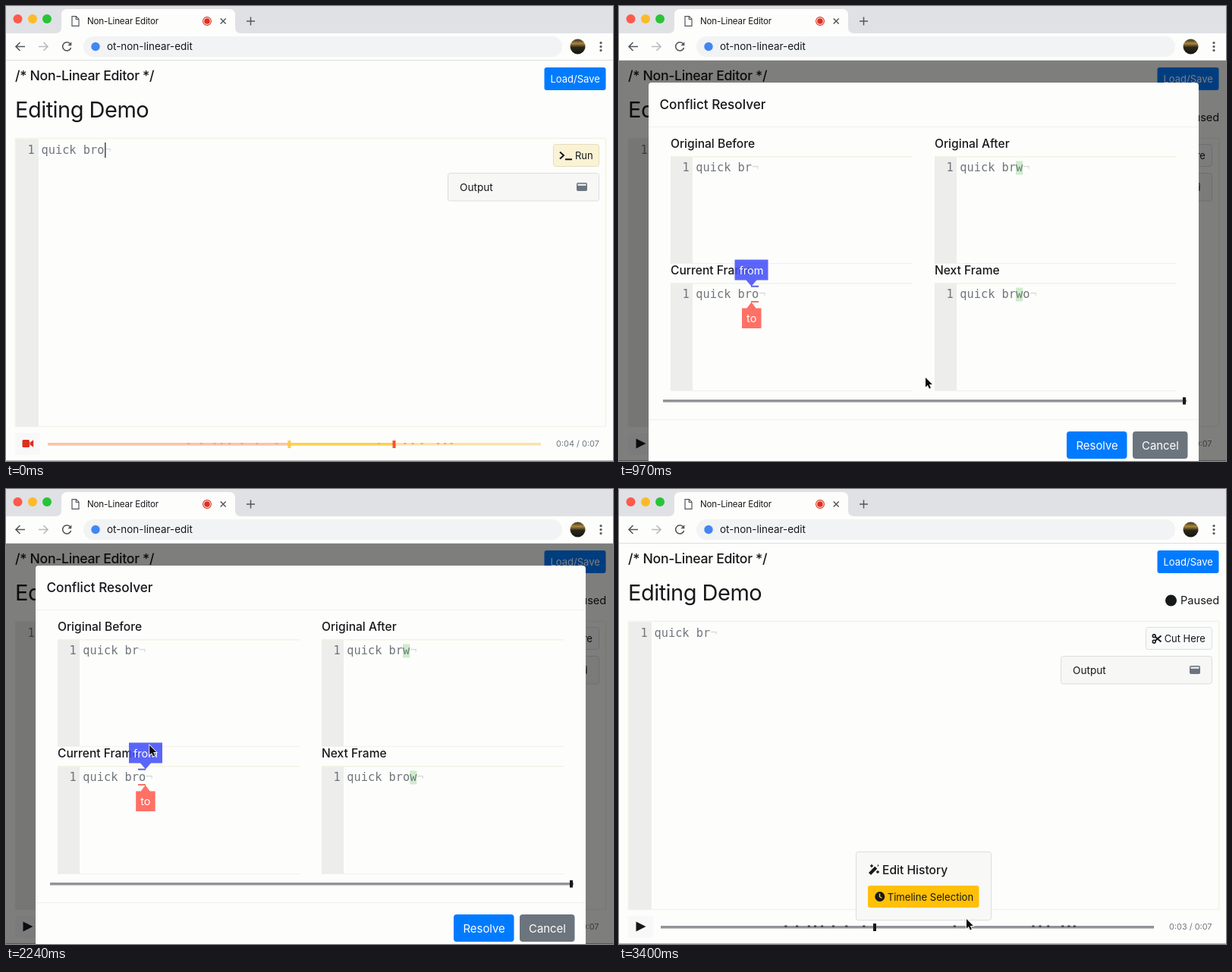
Write an HTML page that moves like this. It is 800 px wide and 600 px high and loops after 3430 ms.

```html
<!DOCTYPE html>
<html lang="en">
<head>
<meta charset="utf-8">
<title>Non-Linear Editor</title>
<style>
  html, body { margin: 0; width: 100%; height: 100%; overflow: hidden; background: #fdfdfc; }
  svg { display: block; width: 800px; height: 600px; }
  text { font-family: Inter, "Open Sans", sans-serif; fill: #16181a; }
  .tight { letter-spacing: -.018em; }
  .mid { font-weight: 500; }
  .light { fill: #fff; }
  .muted { fill: #6c757d; }
  .code { font: 15.3px "DejaVu Sans Mono", monospace; fill: #70767c; white-space: pre; }
  .eol { fill: #d8d9d9; }
  .line { fill: none; stroke: #16181a; stroke-width: 1.6; }
  .icon { stroke: #54585c; }
</style>
</head>
<body>
<svg id="stage" viewBox="0 0 800 600" xmlns="http://www.w3.org/2000/svg"></svg>
<script>
const LOOP = 3430, OPEN = 515, CLOSE = 3150;
const INK = '#16181a', PAPER = '#fdfdfc', GUTTER = '#ededec', EDGE = '#f3f3e2', RULE = '#f1f1e8';
const BORDER = '#dcdddd', BLUE = '#007bff', GRAY = '#6c757d', TRACK = '#929298', RED = '#dc3020';

const rect = (x, y, w, h, fill, extra = '') =>
  `<rect x="${x}" y="${y}" width="${w}" height="${h}" fill="${fill}" ${extra}/>`;
const box = (x, y, w, h, fill, stroke, extra = '') =>
  rect(x + .5, y + .5, w - 1, h - 1, fill, `rx="3" stroke="${stroke}" ${extra}`);
const circle = (x, y, r, fill, extra = '') =>
  `<circle cx="${x}" cy="${y}" r="${r}" fill="${fill}" ${extra}/>`;
const path = (d, extra = '') => `<path d="${d}" ${extra}/>`;
const text = (x, y, s, size, extra = '') =>
  `<text x="${x}" y="${y}" font-size="${size}" ${extra}>${s}</text>`;
const code = (x, y, s, id = '') =>
  `<text class="code" x="${x}" y="${y}" ${id && `id="${id}"`}>${s}<tspan class="eol">¬</tspan></text>`;

function chrome() {
  return rect(0, 0, 800, 36, '#dfe1e5') + rect(0, 36, 800, 35, PAPER) + rect(0, 71, 800, 1, '#dcdddd') +
    path('M65 36q8 0 8-8V12q0-8 8-8h213q8 0 8 8v16q0 8 8 8z', `fill="${PAPER}"`) +
    circle(15.5, 17, 6, '#fc5a4c') + circle(35, 17, 6, '#fdba28') + circle(54, 17, 6, '#28c438') +
    path('M87 13.7h5.5l3.5 3.5v9.1h-9zM92.3 14v3.5h3.5', 'class="line icon" style="stroke-width:1.2"') +
    text(107, 24, 'Non-Linear Editor', 11.6, 'style="letter-spacing:-.015em"') +
    circle(265, 20, 5.4, 'none', `stroke="${RED}" stroke-width="1.1"`) + circle(265, 20, 3.8, RED) +
    path('M282.7 16.5l7 7m0-7l-7 7M317 20h11m-5.5-5.5v11', 'class="line icon" style="stroke-width:1.5"') +
    path('M25 53.5H13m5.5-5.5L13 53.5l5.5 5.5', 'class="line icon"') +
    path('M43 53.5h12m-5.5-5.5l5.5 5.5l-5.5 5.5', 'class="line" style="stroke:#b8babd"') +
    path('M84.7 50a5.6 5.6 0 1 0 .9 5', 'class="line icon"') + path('M86.3 47.3v5h-5z', 'fill="#54585c"') +
    rect(102, 40, 631, 27, '#f1f3f4', 'rx="13.5"') + circle(118, 53.5, 5.7, '#4285f4') +
    text(133, 58, 'ot-non-linear-edit', 13.45) +
    circle(753.5, 53.5, 10, 'url(#photo)') +
    [48.5, 53.5, 58.5].map(y => circle(784, y, 1.6, '#54585c')).join('');
}

function commonPage() {
  return rect(0, 72, 800, 528, PAPER) +
    text(12, 98, '/* Non-Linear Editor */', 17.7, 'class="mid tight"') +
    text(12, 147, 'Editing Demo', 29, 'class="tight"') +
    rect(709.5, 81, 81, 30, BLUE, 'rx="3"') + text(717.5, 101, 'Load/Save', 13, 'class="light"') +
    rect(12.5, 174.5, 778, 380, PAPER, `stroke="${EDGE}" stroke-width="1.5"`) +
    rect(13, 175.5, 30, 379, GUTTER) +
    '<text class="code" x="28.5" y="195">1</text>' +
    box(582, 220, 200, 37.5, '#f7f7f6', BORDER) + text(598, 243.5, 'Output', 13.6) +
    rect(752.5, 233.5, 13, 10, GRAY, `rx="1" stroke="${GRAY}"`) +
    rect(753.5, 234.5, 11, 2.5, '#e4e6e7') +
    rect(0, 599, 800, 1, '#b0b0b0');
}

function recordPage() {
  return code(46.5, 195, 'quick bro') + rect(130, 180, 1.6, 20, '#4c5458', 'id="caret"') +
    box(721, 182, 61, 30, '#fbf2d4', '#e4dcbc') +
    path('M730 192.5l5 4.5l-5 4.5M737 202.2h9', 'class="line" style="stroke-width:2"') +
    text(750, 202, 'Run', 13) +
    rect(12, 563, 33, 29, '#f8f8f8', 'id="recBtn" rx="3"') +
    rect(21.5, 572, 9.5, 10, RED, 'rx="1.5"') + path('M31.5 575.5l4.7-3.2v9.4l-4.7-3.2z', `fill="${RED}"`) +
    rect(55, 576, 650, 3.5, '#fbe3a6') + rect(55, 576, 0, 3.5, '#fac4a8', 'id="before"') +
    rect(0, 576, 0, 3.5, '#ffd04c', 'id="span"') + '<g id="recTicks"></g>' +
    rect(0, 573, 4, 10, '#ffcb48', 'id="startPin"') + rect(0, 573, 4, 10, '#ff5030', 'id="endPin"') +
    text(725, 581, '', 10.9, 'id="clock" class="muted"');
}

function pausedPage() {
  return code(46.5, 195, 'quick br') +
    circle(727.5, 147, 7.5, INK) + text(740, 152, 'Paused', 14.6) +
    box(694, 182, 88, 30, '#f9fafa', BORDER) +
    path('M706.5 194.8l8 6.7M706.5 200.2l8-6.7', 'class="line" style="stroke-width:2"') +
    circle(705.2, 193.8, 1.9, 'none', 'class="line"') + circle(705.2, 201.2, 1.9, 'none', 'class="line"') +
    text(718.7, 202, 'Cut Here', 12.9) +
    rect(12, 563, 33, 29, '#f8f8f8', 'rx="3"') + path('M22.5 570.5l13 6.5l-13 6.5z', `fill="${INK}"`) +
    rect(55, 576, 650, 3.5, TRACK) + '<g id="pauseTicks"></g>' + rect(335, 573, 4, 10, INK) +
    text(725, 581, '0:03 / 0:07', 10.9, 'class="muted"') +
    box(312, 478, 179, 91, '#f8f8f7', BORDER) +
    path('M330.5 507.5l8.5-8.5', 'class="line" style="stroke-width:4.2"') +
    path('M337.5 497.5l3.5 3.5', 'stroke="#f8f8f7" stroke-width="1"') +
    path('M333 495v4m-2-2h4M341 503v4m-2-2h4M341.5 495.5v2', 'class="line" style="stroke-width:1.4"') +
    text(347, 508, 'Edit History', 15.6, 'class="mid"') +
    rect(328, 523, 146.5, 29, '#ffc007', 'rx="3"') + circle(343.8, 537.5, 6.5, INK) +
    path('M343.5 533.5v4l3 2', 'fill="none" stroke="#ffc007" stroke-width="1.5"') +
    text(353.7, 542.5, 'Timeline Selection', 13.1);
}

function pane(x, y, h, title, body, id = '') {
  const marked = body.indexOf('w') > 0;
  return text(x, y - 12, title, 15.6, 'class="mid"') + rect(x, y, 29, h, GUTTER) +
    rect(x, y - 1, 319, 1.5, EDGE) + rect(x, y + h, 319, 1, RULE) +
    (marked ? rect(x + 107, y + 5.5, 9.2, 18, '#cdeccb', id && `id="${id}Mark"`) : '') +
    `<text class="code" x="${x + 15.5}" y="${y + 19}">1</text>` + code(x + 33.3, y + 19, body, id);
}

function dialog() {
  return rect(39, 101, 725, 520, PAPER, 'rx="4"') +
    text(53.5, 136, 'Conflict Resolver', 17.15, 'class="mid"') +
    rect(39, 159, 725, 1, RULE) + rect(39, 545, 725, 1, RULE) +
    pane(68, 199, 140, 'Original Before', 'quick br') +
    pane(416, 199, 140, 'Original After', 'quick brw') +
    rect(174, 371, 10, 18, '#ffd4bc', 'id="range"') +
    pane(68, 366, 141, 'Current Frame', 'quick bro') +
    pane(416, 366, 141, 'Next Frame', 'quick brwo', 'next') +
    rect(174, 368.7, 10, 2, '#5862d0') + rect(174, 389, 10, 2, '#f07868') +
    '<g id="from">' + path('M152.5 334.5h44v27h-15l-7 8l-7-8h-15z', 'fill="#434ffa" fill-opacity=".87"') +
    text(174.5, 353.5, 'from', 14.5, 'text-anchor="middle" class="light"') + '</g>' +
    '<g id="to">' + path('M162 398.5h6.5l6-8l6 8h7v26.5h-25.5z', 'fill="#ff7066"') +
    text(174.7, 417, 'to', 14.5, 'text-anchor="middle" class="light"') + '</g>' +
    rect(58, 519, 690, 3.5, TRACK) + rect(743, 516, 4, 9.5, INK) +
    rect(588.5, 559.5, 82, 39, '#8fbdf4', 'id="ring" rx="5"') +
    rect(590, 561, 79.5, 36, BLUE, 'id="resolve" rx="4"') +
    text(602.5, 584.5, 'Resolve', 14.9, 'class="light"') +
    rect(677, 561, 72.5, 36, GRAY, 'rx="4"') + text(689, 584.5, 'Cancel', 14.9, 'class="light"');
}

const stage = document.getElementById('stage');
stage.innerHTML =
  `<defs><linearGradient id="photo" x1="0" y1="0" x2="0" y2="1">
    <stop offset="0" stop-color="#3a3220"/><stop offset=".3" stop-color="#a8863c"/>
    <stop offset=".55" stop-color="#2c2618"/><stop offset="1" stop-color="#141410"/>
  </linearGradient></defs>` +
  commonPage() + `<g id="recording">${recordPage()}</g><g id="paused">${pausedPage()}</g>` +
  `<g id="modal">${rect(0, 71, 800, 529, '#000', 'opacity=".5"')}${dialog()}</g>` + chrome() +
  path('M0 0v12.6l2.9-2.7l2 4.5l2-.9l-2-4.4h4z',
    'id="mouse" fill="#0a0a0a" stroke="#fff" stroke-width="1.6" paint-order="stroke"');

const el = {};
stage.querySelectorAll('[id]').forEach(n => el[n.id] = n);
const set = (id, attrs) => { for (const k in attrs) el[id].setAttribute(k, attrs[k]); };
const show = (id, on) => set(id, { visibility: on ? 'inherit' : 'hidden' });
const ramp = (t, a, b) => Math.max(0, Math.min(1, (t - a) / (b - a)));

const CUT = 3.43, LEN = 7, HEAD = 4.916, RATE = .81 / 470;
const early = [2, 2.18, 2.37, 2.47, 2.58, 2.76, 2.97, 3.25];
const typed = [4.7, 4.905];
const late = [1.93, 1.82, 1.69, 1.46, 1.36, 1.27];   // seconds before the end

function timeline(t) {
  const grown = RATE * Math.min(t, OPEN), len = LEN + grown;
  const at = s => 55 + 650 * s / len;
  return { at, marks: [...early, ...typed, ...late.map(s => len - s)], head: HEAD + grown };
}
const ticks = (tl, y, fill) => tl.marks.map(s => rect((tl.at(s) - 1.5).toFixed(2), y, 3, 2, fill)).join('');
el.pauseTicks.innerHTML = ticks(timeline(OPEN), 575.5, '#303234');

const route = [
  [170, 240, 440], [430, 31, 579], [540, 31, 579], [930, 404, 490], [1060, 404, 490],
  [1380, 176, 404], [1480, 176, 404], [1680, 187, 404], [1800, 187, 404], [2080, 183, 338],
  [2140, 183, 338], [2300, 192, 338], [2350, 192, 338], [2630, 532, 477],
  [2690, 532, 477], [2990, 619, 570], [3160, 619, 570], [3390, 458, 567], [LOOP, 458, 567]
];
function pointer(t) {
  let i = 1;
  while (i < route.length - 1 && route[i][0] < t) i++;
  const [t0, x0, y0] = route[i - 1], [t1, x1, y1] = route[i];
  const p = ramp(t, t0, t1), e = p * p * (3 - 2 * p);
  return [x0 + (x1 - x0) * e, y0 + (y1 - y0) * e];
}

function drawRecording(t) {
  const tl = timeline(t), a = tl.at(CUT), b = tl.at(tl.head);
  set('before', { width: a - 55 });
  set('span', { x: a, width: b - a });
  set('startPin', { x: a - 2 });
  set('endPin', { x: b - 2 });
  el.recTicks.innerHTML = ticks(tl, 576, '#f2a490');
  el.clock.textContent = `0:0${Math.floor(tl.head)} / 0:07`;
  set('recBtn', { fill: t > 390 ? '#e4e6e8' : '#f8f8f8' });
}

function drawModal(t) {
  const toMoved = t >= 1580, fromMoved = t >= 2220;
  const merged = fromMoved ? 'brow' : toMoved ? 'brw' : 'brwo';
  set('to', { transform: `translate(${toMoved ? 9.2 : 0} 0)` });
  set('from', { transform: `translate(${fromMoved ? 9.5 : 0} 0)` });
  show('range', toMoved && !fromMoved);
  el.next.firstChild.data = 'quick ' + merged;
  set('nextMark', { x: 449.3 + 9.21 * (6 + merged.indexOf('w')) });
  show('ring', t > 3030);
  set('resolve', { fill: t > 2920 ? '#0062cc' : BLUE });
}

function draw(t) {
  const live = t < OPEN;
  show('recording', live);
  show('paused', !live);
  show('caret', live && t < 295);
  show('modal', !live && t < CLOSE);
  if (live) drawRecording(t);
  drawModal(t);
  if (live || t >= CLOSE) show('range', false), show('ring', false);

  const [x, y] = pointer(t);
  show('mouse', t >= 170);
  set('mouse', { transform: `translate(${x.toFixed(2)} ${y.toFixed(2)})` });
}

const start = performance.now();
function tick() {
  draw((performance.now() - start) % LOOP);
  requestAnimationFrame(tick);
}
tick();
</script>
</body>
</html>
```
